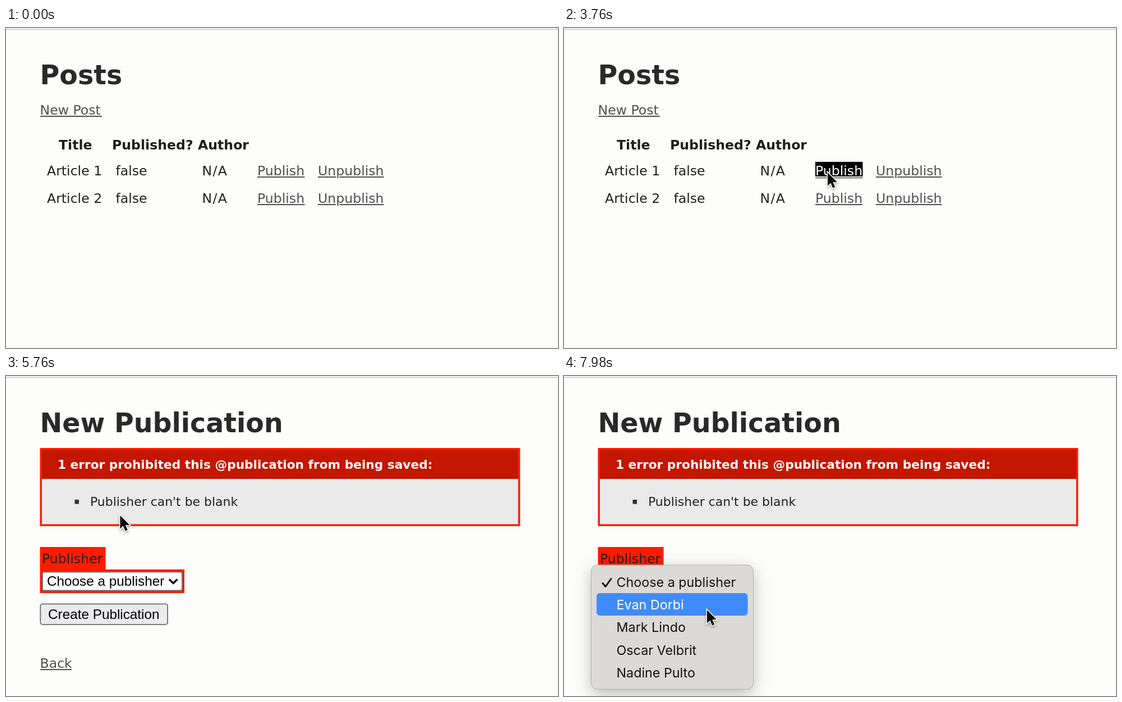
Write an HTML page that moves like this. It is 984 by 569 pixels and loops after 8 s.

```html
<!DOCTYPE html>
<html lang="en">
<head>
<meta charset="utf-8">
<title>Publishing posts</title>
<style>
  html, body { margin: 0; width: 100%; height: 100%; overflow: hidden; background: #fdfdfc; }
  svg { display: block; width: 984px; height: 569px; }
  text { font: 23.6px "DejaVu Sans", sans-serif; fill: #202020; white-space: pre; }
  .head { font-size: 47.5px; font-weight: bold; fill: #292929; }
  .bold { font-weight: bold; fill: #1e1e1e; }
  .na { letter-spacing: 1.3px; }
  .notice { font-size: 21.68px; fill: #fff; }
  .detail { font-size: 21.95px; }
  .control { font: 24.3px "Liberation Sans", Arial, sans-serif; fill: #000; }
  .link text { fill: #505050; }
  .link path { stroke: #505050; stroke-width: 2; }
  .link rect { display: none; }
  .link.hover rect { display: inline; }
  .link.hover text { fill: #fff; }
  .link.hover path { stroke: #fff; }
  .red { fill: #ff1c00; }
  .box { stroke: #6d6d6d; stroke-width: 1.8; }
  .clean .error { display: none; }
  .clean .label { transform: translate(-3.6px, -180px); }
  .clean .select { transform: translate(-3.6px, -187px); }
  .clean .below { transform: translateY(-191px); }
  #menu text { font: 23.3px Inter, sans-serif; fill: #121212; }
  #menu text.active { fill: #fff; }
  #panel { filter: drop-shadow(0 9px 14px rgba(0, 0, 0, .25)); }
  #arrow { filter: drop-shadow(0 2px 2px rgba(0, 0, 0, .35)); }
</style>
</head>
<body>
<svg viewBox="0 0 984 569">
  <rect width="984" height="569" fill="#fdfdfc"/>
  <path d="M0 2.5H984" stroke="#c2c2c0" stroke-width="1.6"/>

  <g id="posts">
    <text class="head" x="60.5" y="99.5">Posts</text>
    <g class="link"><text x="60.5" y="154">New Post</text><path d="M61 157h110"/></g>
    <text class="bold" x="94" y="216">Title</text>
    <text class="bold" x="189" y="216">Published?</text>
    <text class="bold" x="342" y="216">Author</text>
    <g fill="#a6cefa">
      <rect id="selectFlag" x="195.5" y="236" height="33"/>
      <rect id="selectAuthor" x="349.5" y="236" height="33"/>
    </g>
    <g id="rows"></g>
  </g>

  <g id="form">
    <text class="head" x="60.5" y="99.5">New Publication</text>
    <g class="error">
      <rect class="red" x="60.5" y="128" width="856" height="139"/>
      <rect x="64" y="131.5" width="849" height="52" fill="#c41600"/>
      <rect x="64" y="183" width="849" height="80.5" fill="#eaeaeb"/>
      <text class="bold notice" x="92" y="164.5">1 error prohibited this @publication from being saved:</text>
      <rect x="122.5" y="220" width="7.5" height="7.5" fill="#333"/>
      <text class="detail" x="150" y="230.5">Publisher can't be blank</text>
      <rect class="red" x="60.5" y="304" width="117" height="41"/>
      <rect class="red" x="60.5" y="344" width="257.5" height="42"/>
    </g>
    <text class="label" x="64" y="333">Publisher</text>
    <g class="select">
      <rect class="box" x="65" y="348.5" width="249" height="33" rx="3" fill="#fefefe"/>
      <text class="control" x="73" y="373">Choose a publisher</text>
      <path d="M291 361.5l7.2 7 7.2-7" fill="none" stroke="#000" stroke-width="3.3"/>
    </g>
    <g class="below">
      <rect class="box" x="61.3" y="405.3" width="226.8" height="36.5" rx="4" fill="#ebebed"/>
      <text class="control" x="75" y="432">Create Publication</text>
      <g class="link"><text x="60.5" y="519">Back</text><path d="M61 522h56"/></g>
    </g>
  </g>

  <g id="menu">
    <rect id="panel" x="48.5" y="336" width="289" height="221" rx="11" fill="#dcdad9" stroke="#b2b0af"/>
    <rect id="highlight" x="58" width="269.5" height="40" rx="6" fill="#3f8bfc"/>
    <path id="tick" d="M69 368.5l5 6L84 360.5" fill="none" stroke-width="3" stroke-linecap="round" stroke-linejoin="round"/>
  </g>

  <path id="arrow" d="M0 0V23.5L5.3 18.5 9.3 27.5 13.2 25.8 9.3 17H16.8Z"
        stroke="#fff" stroke-width="3" paint-order="stroke"/>
  <g id="beam" fill="none" stroke-linecap="square">
    <path d="M-5-14Q0-14 0-10V10Q0 14-5 14M5-14Q0-14 0-10M0 10Q0 14 5 14M-3 2H3" stroke="#fff" stroke-width="5"/>
    <path d="M-5-14Q0-14 0-10V10Q0 14-5 14M5-14Q0-14 0-10M0 10Q0 14 5 14M-3 2H3" stroke="#000" stroke-width="2"/>
  </g>
</svg>
<script>
const LOOP = 8000;
const $ = id => document.getElementById(id);
const show = (id, on) => $(id).style.display = on ? '' : 'none';
const clamp = (v, lo, hi) => Math.min(hi, Math.max(lo, v));

$('rows').innerHTML = [1, 2].map(n => {
  const y = 213 + n * 49, line = y + 3;
  return `<text x="73" y="${y}">Article ${n}</text>
    <text x="195.5" y="${y}">false</text>
    <text class="na" x="349.5" y="${y}">N/A</text>
    <g class="link" id="publish${n}"><rect x="448" y="${y - 24}" width="84.5" height="29"/>
      <text x="448" y="${y}">Publish</text><path d="M448 ${line}h84.5"/></g>
    <g class="link"><text x="556" y="${y}">Unpublish</text>
      <path d="M556 ${line}h32M594.5 ${line}h79"/></g>`;
}).join('');

const names = ['Choose a publisher', 'Evan Dorbi', 'Mark Lindo', 'Oscar Velbrit', 'Nadine Pulto'];
$('menu').insertAdjacentHTML('beforeend', names.map((name, i) =>
  `<text x="93.5" y="${375 + i * 40.2}">${name}</text>`).join(''));
const items = [...$('menu').querySelectorAll('text')];

// Pointer stops: time, x, y
const stops = [
  [40, 330, 425], [820, 235, 330], [1500, 196, 257], [1660, 196, 257],
  [1980, 392, 257], [2400, 394, 257], [2700, 400, 275], [3240, 452, 262],
  [3760, 470, 257], [4080, 470, 257], [4440, 220, 232], [4640, 220, 232],
  [5060, 251.5, 290], [5400, 262, 252], [5760, 203.5, 248], [6000, 203.5, 250],
  [6740, 215, 468], [6880, 218.5, 503], [7260, 268, 366], [7480, 268, 366],
  [7800, 256, 412], [7980, 255, 416]
];

function pointerAt(t) {
  const next = stops.findIndex(s => s[0] > t);
  if (next < 1) return (next ? stops.at(-1) : stops[0]).slice(1);
  const [t0, x0, y0] = stops[next - 1], [t1, x1, y1] = stops[next];
  const u = (t - t0) / (t1 - t0), k = u * u * (3 - 2 * u);
  return [x0 + (x1 - x0) * k, y0 + (y1 - y0) * k];
}

function draw(t) {
  const [x, y] = pointerAt(t);
  const onForm = t >= 4040, menuOpen = t >= 7320;
  show('posts', !onForm);
  show('form', onForm);
  $('form').classList.toggle('clean', t < 4620);

  const beam = t >= 1300 && t < 3240;
  const reach = t >= 1660 && t < 2560 ? x + 3 : 0;
  $('selectFlag').setAttribute('width', clamp(reach - 195.5, 0, 64));
  $('selectAuthor').setAttribute('width', clamp(reach - 349.5, 0, 45.5));
  $('publish1').classList.toggle('hover', !beam && x >= 448 && x <= 532 && y >= 238 && y <= 267);

  show('menu', menuOpen);
  const active = clamp(Math.floor((y - 346) / 40), 0, names.length - 1);
  $('highlight').setAttribute('y', 346 + active * 40);
  $('tick').setAttribute('stroke', active ? '#111' : '#fff');
  items.forEach((item, i) => item.classList.toggle('active', i === active));

  show('arrow', t >= 40 && !beam);
  show('beam', beam);
  $(beam ? 'beam' : 'arrow').setAttribute('transform', `translate(${x} ${y})`);
}

function tick() {
  draw(performance.now() % LOOP);
  requestAnimationFrame(tick);
}
tick();
</script>
</body>
</html>
```
